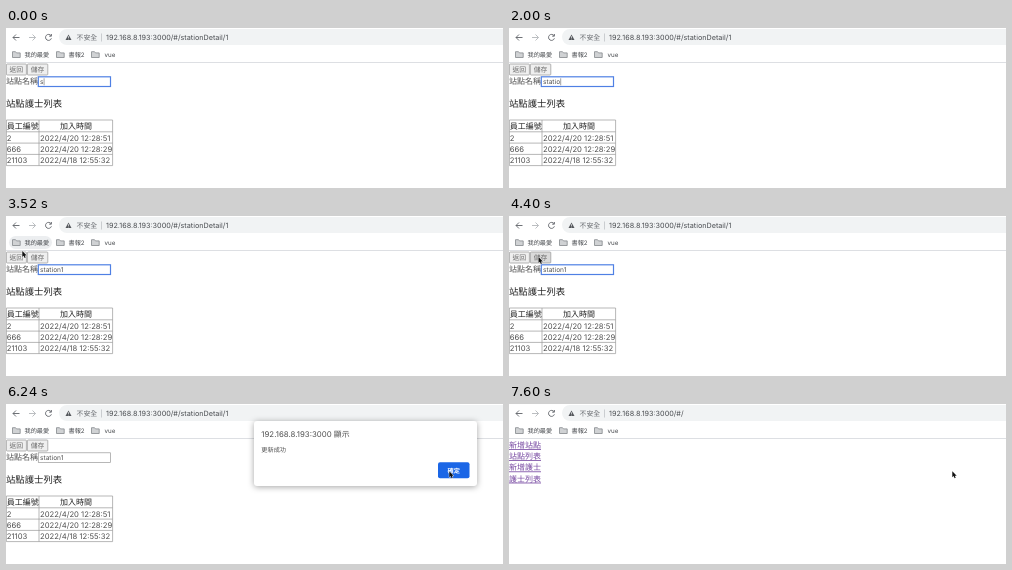
These frames come from a looping animation (497x160 px, 7680 ms). An HTML page:

```html
<!DOCTYPE html>
<html>
<head>
<meta charset="utf-8">
<style>
html, body { margin: 0; width: 497px; height: 160px; overflow: hidden; background: #fff; }
svg { position: absolute; left: 0; top: 0; overflow: visible; }
text { font-family: Inter, "Noto Sans CJK TC", "Noto Sans CJK", sans-serif; font-size: 8px; fill: #222; text-rendering: geometricPrecision; white-space: pre; }
.bar { font-size: 7.22px; fill: #4a4d51; }
.mark { font-size: 6.2px; fill: #46494d; }
.btn rect { fill: #efefef; stroke: #959595; stroke-width: .7; }
.btn text { font-size: 6.8px; fill: #666; }
.soft { fill: #505050; }
.cells { font-size: 7.7px; fill: #505050; }
.links text { fill: #7546a0; text-decoration: underline; text-decoration-thickness: .6px; }
#dialog { position: absolute; left: 248px; top: 17px; width: 223px; height: 65px; background: #fff; border-radius: 3px; box-shadow: 0 1px 6px rgba(0,0,0,.36); transform-origin: 50% 100%; }
</style>
</head>
<body>
<svg width="497" height="160">
  <defs>
    <path id="folder" d="M.5 1.2h3l1 1.2h3.7v4.6h-7.7z" fill="#d0d2d4" stroke="#85888c" stroke-width=".8" stroke-linejoin="round"/>
  </defs>
  <!-- Browser toolbar -->
  <rect x="53" y="1" width="460" height="16" rx="8" fill="#f1f3f4"/>
  <g fill="none" stroke="#5f6368" stroke-width=".9">
    <path d="M13.5 9.5h-6.5m3-3l-3 3 3 3"/>
    <path d="M23 9.5h6.5m-3-3l3 3-3 3" stroke="#b4b7ba"/>
    <path d="M45 7.7a3 3 0 1 0 .4 2.6M45.4 6v2.2h-2.2"/>
    <path d="M95.5 5.5v8" stroke="#b9bcc0" stroke-width=".7"/>
    <path d="M0 34.5h497" stroke="#dadce0"/>
  </g>
  <path d="M62.5 6.4l3 5.6h-6z" fill="#55585c"/>
  <path d="M62.5 8.2v1.8m0 .6v.8" stroke="#f1f3f4" stroke-width=".7"/>
  <text class="bar" x="70.5" y="12" style="font-size:6.9px;fill:#66696e">不安全</text>
  <text class="bar" id="url" x="100" y="12"></text>
  <rect id="markHover" x="3" y="20" width="43" height="13" rx="6.5" fill="#eceef0"/>
  <use href="#folder" x="6" y="22.5"/><text class="mark" x="18.5" y="28.8">我的最愛</text>
  <use href="#folder" x="50" y="22.5"/><text class="mark" x="62.5" y="28.8">書報2</text>
  <use href="#folder" x="85" y="22.5"/><text class="mark" x="98.5" y="28.8">vue</text>

  <g id="detail">
    <g class="btn"><rect x=".4" y="36" width="20" height="11" rx=".8"/><text x="3.4" y="44.1">返回</text></g>
    <g class="btn"><rect id="save" x="21.4" y="36" width="20.4" height="11" rx=".8"/><text x="24.8" y="44.1">儲存</text></g>
    <text class="soft" y="56.4">站點名稱</text>
    <rect id="field" x="32.3" y="48.8" width="72.2" height="9.7" fill="#fff"/>
    <text id="typed" class="soft" x="34" y="55.9" style="font-size:6.6px"></text>
    <path id="caret" d="M0 50.3v7" stroke="#444" stroke-width=".5"/>
    <text y="79" style="font-size:9.36px">站點護士列表</text>
    <path d="M.4 92H106.6V137.6H.4zM33 92V137.6M.4 103.8H106.6M.4 115.1H106.6M.4 126.4H106.6" fill="none" stroke="#999" stroke-width=".7"/>
    <text x=".8" y="101">員工編號</text>
    <text x="70" y="101" text-anchor="middle">加入時間</text>
    <g id="rows"></g>
  </g>
  <g id="home" class="links">
    <text y="44">新增站點</text>
    <text y="55.2">站點列表</text>
    <text y="66.4">新增護士</text>
    <text y="77.6">護士列表</text>
  </g>
</svg>

<div id="dialog">
  <svg width="223" height="65">
    <text class="soft" x="7.3" y="15.9" style="font-size:7.85px">192.168.8.193:3000 顯示</text>
    <text class="soft" x="7.3" y="30.8" style="font-size:6.2px">更新成功</text>
    <rect x="184" y="41.2" width="31.5" height="16" rx="2" fill="#1b66e6"/>
    <text x="199.7" y="51.5" text-anchor="middle" style="font-size:6.2px;font-weight:700;fill:#fff">確定</text>
  </svg>
</div>

<svg width="497" height="160">
  <path id="cursor" d="M0 0v6l1.4-1.2.9 2.2 1.1-.5-.9-2.1h1.9z" fill="#111" stroke="#fff" stroke-width=".8" paint-order="stroke"/>
</svg>

<script>
const LOOP = 7680, WORD = 'station1';
const KEY_TIMES = [0, 400, 800, 1200, 1600, 1920, 2320, 2720];
const OPEN = 4800, CLOSE = 6560, FADE = 360;
// Pointer stops: time, x, y
const STOPS = [[3280, 58, 55], [3500, 16.3, 35], [3620, 16.3, 35], [3960, 29.5, 41],
  [4960, 29.5, 41], [5440, 288, 68.5], [5520, 300, 67], [6240, 443.3, 67.3]];
const $ = id => document.getElementById(id);
const show = (id, on) => $(id).style.display = on ? '' : 'none';
const clamp = v => Math.max(0, Math.min(1, v));
const smooth = v => v * v * (3 - 2 * v);

$('rows').innerHTML = [['2', '2022/4/20 12:28:51'], ['666', '2022/4/20 12:28:29'], ['21103', '2022/4/18 12:55:32']]
  .map(([id, date], i) => {
    const y = 112.6 + i * 11.2;
    return `<text class="cells" x=".8" y="${y}">${id}</text><text class="cells" x="34" y="${y}">${date}</text>`;
  }).join('');

function pointerAt(t) {
  const i = STOPS.findIndex(s => s[0] > t);
  if (i < 0) return STOPS[STOPS.length - 1].slice(1);
  const a = STOPS[Math.max(0, i - 1)], b = STOPS[i];
  const p = smooth(clamp((t - a[0]) / (b[0] - a[0] || 1)));
  return [a[1] + (b[1] - a[1]) * p, a[2] + (b[2] - a[2]) * p];
}

function draw(now) {
  const t = now % LOOP, home = t >= CLOSE, focused = t < 4560;
  const [x, y] = pointerAt(t);

  $('url').textContent = '192.168.8.193:3000/#/' + (home ? '' : 'stationDetail/1');
  show('detail', !home);
  show('home', home);

  const pressed = KEY_TIMES.filter(k => k <= t);
  $('typed').textContent = WORD.slice(0, pressed.length);
  $('field').setAttribute('stroke', focused ? '#4f80e4' : '#999');
  $('field').setAttribute('stroke-width', focused ? 1.2 : .7);
  show('caret', focused && (t - pressed[pressed.length - 1]) % 1000 < 500);
  $('caret').setAttribute('transform', `translate(${34.6 + $('typed').getComputedTextLength()})`);

  show('cursor', t >= STOPS[0][0]);
  $('cursor').setAttribute('transform', `translate(${x} ${y})`);
  show('markHover', t >= STOPS[0][0] && t < OPEN && x < 46 && y < 36);
  const overSave = t >= 3840 && t < OPEN && x > 21 && x < 42;
  $('save').style.fill = overSave ? (t >= 4320 ? '#dadada' : '#e5e5e5') : '';

  const out = clamp((t - CLOSE) / FADE);
  show('dialog', t >= OPEN && out < 1);
  $('dialog').style.opacity = clamp((t - OPEN + 80) / 240) * (1 - out);
  $('dialog').style.transform = out ? `translateY(${-10.5 * out}px) perspective(400px) rotateX(${23 * out}deg)` : '';
}

const start = performance.now();
function tick() {
  draw(performance.now() - start);
  requestAnimationFrame(tick);
}
tick();
</script>
</body>
</html>
```
